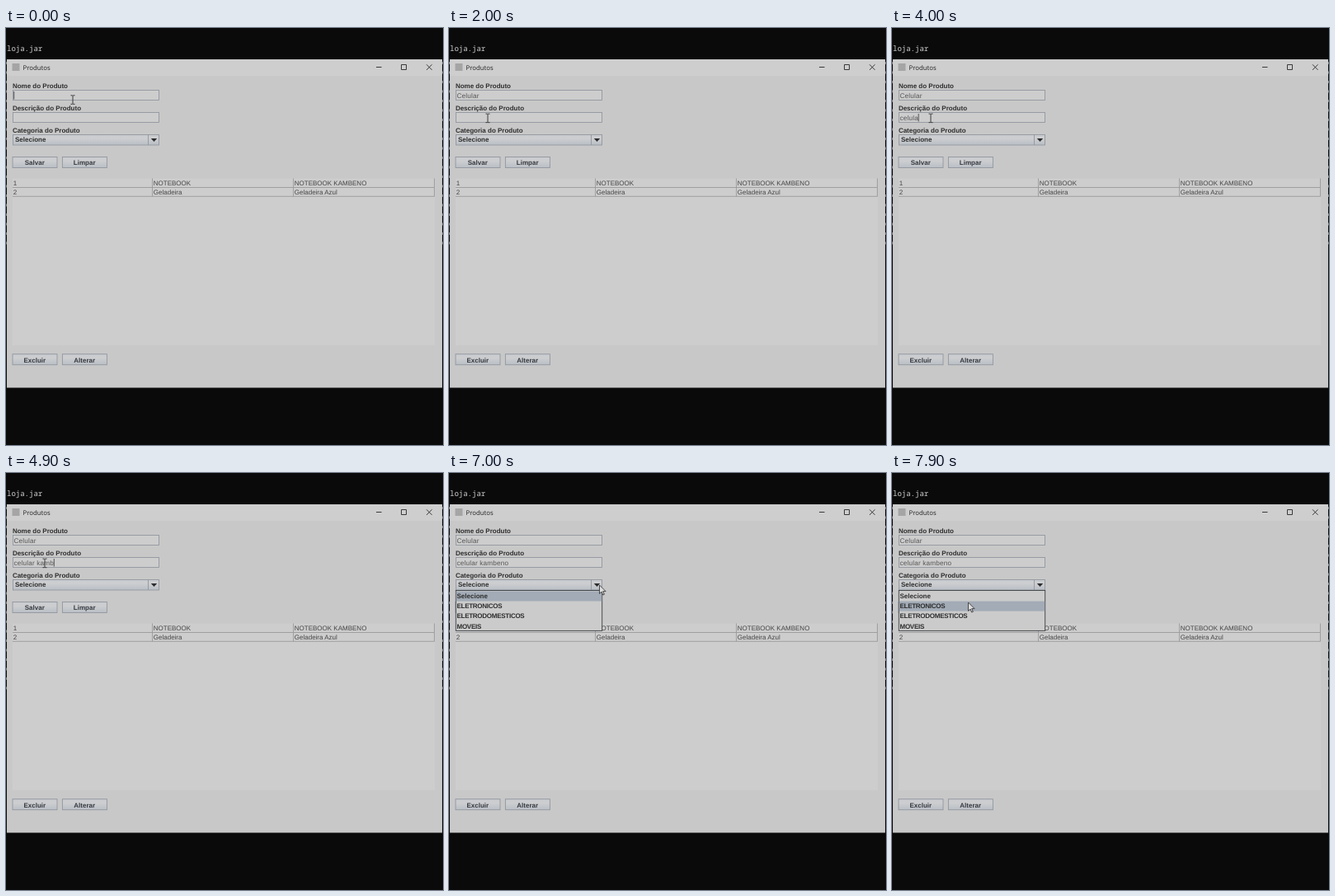
Recreate the animation shown at these times as an HTML page. Size 530 by 506 pixels, loop 8000 ms.

```html
<!DOCTYPE html>
<html lang="pt">
<head>
<meta charset="utf-8">
<title>Produtos</title>
<style>
html, body { margin: 0; width: 100%; height: 100%; overflow: hidden; background: #0a0a0a; }
svg { display: block; width: 530px; height: 506px; }
text { font: 8.1px "Liberation Sans", Arial, sans-serif; fill: #454545; white-space: pre; text-rendering: geometricPrecision; }
.bold { font-weight: bold; font-size: 8px; fill: #2e2e2e; }
.mid { text-anchor: middle; fill: #363a40; }
.caps { letter-spacing: -.27px; }
.cell { font-size: 8px; }
.typed { font-size: 8.2px; letter-spacing: .18px; fill: #555; }
.title { font: 7.8px "Open Sans", sans-serif; fill: #222; }
.term { font: 9px "Noto Sans Mono", monospace; fill: #cfcfcf; }
</style>
</head>
<body>
<svg id="stage" viewBox="0 0 530 506">
  <defs>
    <linearGradient id="metal" x2="0" y2="1">
      <stop offset="0" stop-color="#c8cbcf"/>
      <stop offset=".35" stop-color="#cdced0"/>
      <stop offset="1" stop-color="#b9bfc6"/>
    </linearGradient>
  </defs>
</svg>
<script>
const LOOP = 8000, STEP = 100;
const EDGE = '#92979e', GRID = '#9a9a9a';
const stage = document.getElementById('stage');

function add(tag, attrs, parent = stage) {
  const el = document.createElementNS('http://www.w3.org/2000/svg', tag);
  for (const key in attrs) el.setAttribute(key, attrs[key]);
  return parent.appendChild(el);
}
const rect = (x, y, width, height, fill, stroke = 'none', parent) =>
  add('rect', { x, y, width, height, fill, stroke, 'stroke-width': .9 }, parent);
const path = (d, stroke, fill = 'none', parent) =>
  add('path', { d, stroke, fill, 'stroke-width': .9 }, parent);
function label(x, y, str, cls, parent) {
  const el = add('text', { x, y, class: cls }, parent);
  el.textContent = str;
  return el;
}
function button(x, y, str) {
  rect(x, y, 54, 13, 'url(#metal)', EDGE);
  label(x + 26.8, y + 9.8, str, 'bold mid');
}
const show = (el, on) => el.setAttribute('visibility', on ? 'visible' : 'hidden');

// Terminal, with text ends peeking out beside the window
rect(0, 0, 530, 506, '#0a0a0a');
label(1, 27.8, 'loja.jar', 'term');
path('M.4 41V264M529.6 41V264', '#8c8c8c').setAttribute('stroke-dasharray', '3 8.5');

// Window
rect(1, 38, 528, 398.5, '#c8c8c8');
rect(1, 38, 528, 20, '#cecece');
rect(7.5, 43, 9, 9, '#a5a5a5');
label(20.5, 50.5, 'Produtos', 'title');
path('M449 47.5h6.5M479.5 44.5h6v6h-6zM510 44.3l6.6 6.6M516.6 44.3l-6.6 6.6', '#2a2a2a');

// Form
['Nome do Produto', 'Descrição do Produto', 'Categoria do Produto']
  .forEach((str, i) => label(7.9, 72.8 + 27 * i, str, 'bold'));
const fields = [75.5, 102.5].map(y => {
  rect(8.5, y, 177, 12, '#cdcdcd', EDGE);
  return label(9.5, y + 9.2, '', 'typed');
});
rect(8.5, 129.5, 177, 12.5, 'url(#metal)', EDGE);
path('M172.5 129.5v12.5', EDGE);
path('M175.8 134h7.4l-3.7 4z', 'none', '#2c2c2c');
label(11, 138.3, 'Selecione', 'bold');
button(8, 156.5, 'Salvar');
button(68.4, 156.5, 'Limpar');
button(8, 395.7, 'Excluir');
button(68.4, 395.7, 'Alterar');

// Table
rect(8, 182.5, 512, 202.5, '#cdcdcd');
path('M8 193.5H519.5M8 204.3H519.5M177.5 182.5V204.5M348.5 182.5V204.5M519.5 182.5V204.5', GRID);
[['1', 'NOTEBOOK', 'NOTEBOOK KAMBENO'], ['2', 'Geladeira', 'Geladeira Azul']].forEach((row, r) =>
  row.forEach((str, c) => label([8.7, 178.8, 349.8][c], 190.9 + 10.8 * r, str, 'cell')));

// Drop-down list
const popup = add('g', {});
rect(8.3, 142.5, 177.4, 48.9, '#cbcbcb', '#3c3f43', popup);
const hover = rect(8.8, 143.5, 176.4, 12, '#a2abb6', 'none', popup);
['Selecione', 'ELETRONICOS', 'ELETRODOMESTICOS', 'MOVEIS'].forEach((str, i) =>
  label(9.5, 152.2 + 12.1 * i, str, i ? 'bold caps' : 'bold', popup));

const caret = add('path', { stroke: '#333', 'stroke-width': .8 });
const beam = path('M-2.5 -5.2h2l.5 .5 .5 -.5h2M0 -4.7V4.9M-2.5 5.4h2l.5 -.5 .5 .5h2', '#2b2b2b');
const arrow = path('M0 0V10.4L2.5 8.1L4.2 12L5.9 11.3L4.2 7.6H7.6Z', '#3a3a3a', '#dcdcdc');

// Key times of each typed letter
const typing = [
  { text: 'Celular', keys: [300, 400, 500, 700, 900, 1100, 1300] },
  { text: 'celular kambeno',
    keys: [3100, 3300, 3400, 3600, 3800, 4000, 4100, 4300, 4400, 4500, 4600, 4900, 5100, 5300, 5500] }
];
// Pointer stops: time, x, y
const stops = [
  [0, 81, 87], [1500, 81, 87], [2000, 47, 109.3], [5900, 47, 109.3],
  [6300, 236, 124], [6500, 265, 128], [6800, 183, 136], [7000, 182.5, 136],
  [7400, 104, 185], [7700, 92.5, 157], [LOOP, 92.5, 157]
];
const OPEN = 6800;

function pointerAt(t) {
  const i = stops.findIndex(s => s[0] > t);
  const [t0, x0, y0] = stops[i - 1], [t1, x1, y1] = stops[i];
  const p = (t - t0) / (t1 - t0), k = p * p * (3 - 2 * p);
  return [x0 + (x1 - x0) * k, y0 + (y1 - y0) * k];
}

function caretOn(t) {
  if (t < 300) return t < 100;
  if (t < 2200) return t < 1800;
  return t < OPEN && !(t >= 2700 && t < 3100);
}

function draw(time) {
  const t = Math.floor(time % LOOP / STEP) * STEP;
  typing.forEach(({ text, keys }, i) => {
    fields[i].textContent = text.slice(0, keys.filter(k => k <= t).length);
  });

  const active = t < 2200 ? 0 : 1;
  const field = fields[active];
  const cx = 9.7 + (field.textContent ? field.getComputedTextLength() : 0);
  caret.setAttribute('d', `M${cx} ${77 + 27 * active}v9.5`);
  show(caret, caretOn(t));

  const [x, y] = pointerAt(t);
  const inField = t < 6000 || (x < 186 && y < 115);
  for (const el of [beam, arrow]) el.setAttribute('transform', `translate(${x} ${y})`);
  show(beam, inField);
  show(arrow, !inField);

  const row = Math.max(0, Math.min(3, Math.floor((y - 143.5) / 12.1)));
  hover.setAttribute('y', 143.5 + 12.1 * row);
  show(popup, t >= OPEN);
}

const start = performance.now();
function tick() {
  draw(performance.now() - start);
  requestAnimationFrame(tick);
}
tick();
</script>
</body>
</html>
```
